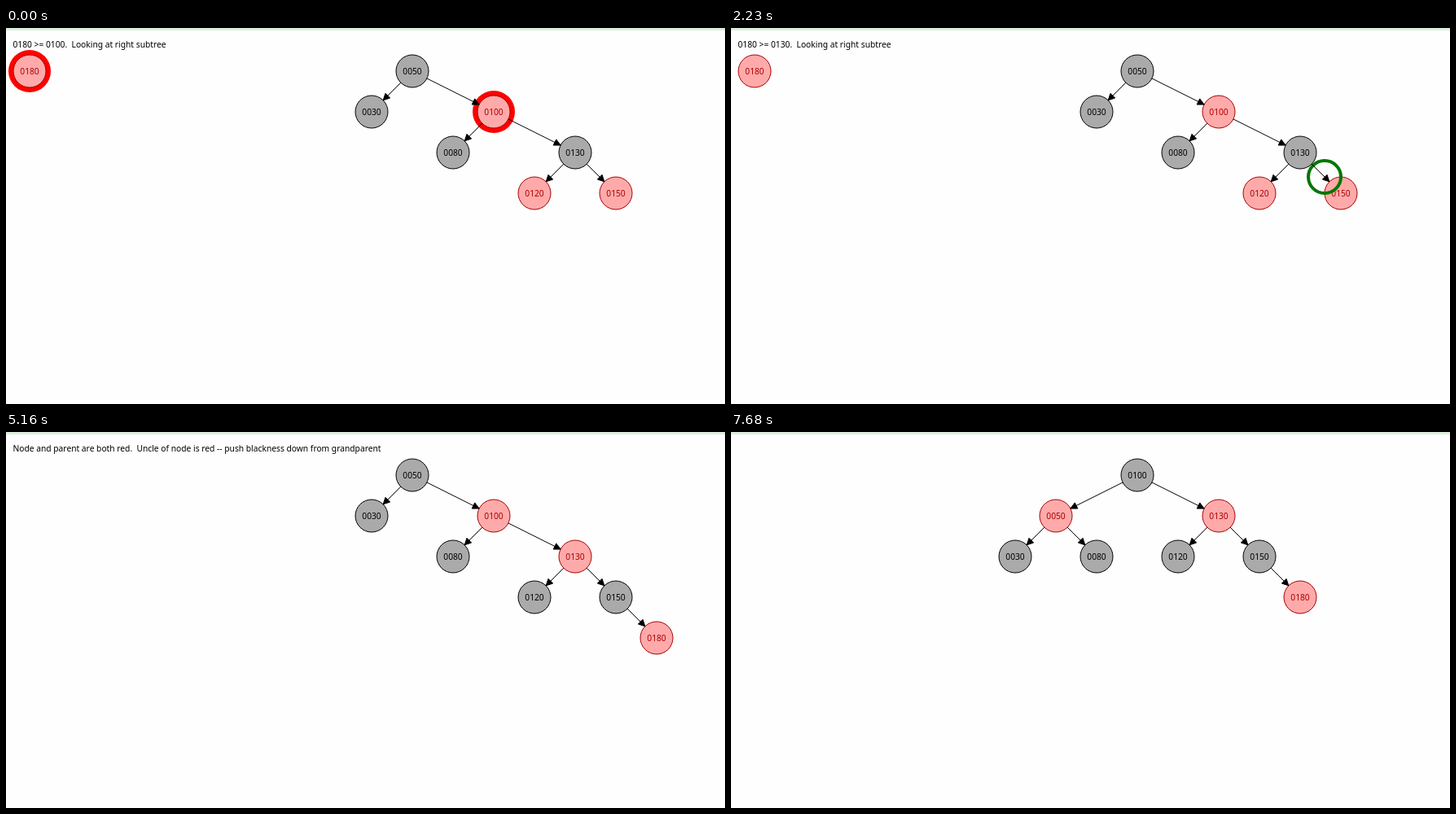
Write an HTML page with a canvas that moves like this. It is 883x462 px and loops after 8.84 s.

```html
<!DOCTYPE html>
<html lang="en">
<head>
<meta charset="utf-8">
<title>Red-black tree insertion</title>
<style>
  html, body { margin: 0; width: 100%; height: 100%; overflow: hidden; background: #fefefe; }
  canvas { display: block; }
</style>
</head>
<body>
<canvas id="stage" width="883" height="462"></canvas>
<script>
const ctx = document.getElementById('stage').getContext('2d');
const LOOP = 8840;
const R = 20;
const RED = { fill: '#ffaaaa', line: '#aa0000' };
const BLACK = { fill: '#aaaaaa', line: '#000000' };

// Runs of evenly spaced picture changes: [first, last, count]
const RUNS = [
  [0, 0, 1], [120, 1080, 8], [1230, 1380, 2], [1510, 2230, 6], [2380, 3290, 7],
  [3410, 3800, 4], [4450, 4450, 1], [5160, 5160, 1], [5760, 5760, 1],
  [6440, 7230, 7], [7370, 7680, 3]
];
const TICKS = RUNS.flatMap(([a, b, n]) =>
  Array.from({ length: n }, (_, i) => n > 1 ? a + (b - a) * i / (n - 1) : a));

// Node places before and after the rotation
const PLACES = {
  '0050': [499, 53, 399, 103],
  '0030': [449, 103, 349, 153],
  '0100': [599, 103, 499, 53],
  '0080': [549, 153, 449, 153],
  '0130': [699, 153, 599, 103],
  '0120': [649, 203, 549, 153],
  '0150': [749, 203, 649, 153],
  '0180': [799, 253, 699, 203]
};

const T = {
  leave100: 600, at130: 1230, leave130: 1870, at150: 2500,
  insert: 3020, inserted: 3545, settled: 3800,
  clash: 4450, recolour: 5160, explain: 5760,
  rotate: 6440, turn: 7006, turned: 7566, done: 7680
};

const MESSAGES = [
  [0, '0180 >= 0100.  Looking at right subtree'],
  [T.at130, '0180 >= 0130.  Looking at right subtree'],
  [T.at150, '0180 >= 0150.  Looking at right subtree'],
  [T.insert, 'Found null tree (or phantom leaf), inserting element'],
  [T.clash, 'Node and parent are both red.  Uncle of node is red -- push blackness down from grandparent'],
  [T.explain, 'Node and parent are both red.  Node is right child, parent is right child\nCan fix extra redness with a single rotation'],
  [T.rotate, 'Single Rotate Left'],
  [T.done, '']
];

const within = (t, a, b) => t >= a && t < b;
const progress = (t, a, b) => Math.min(1, Math.max(0, (t - a) / (b - a)));
const mix = (a, b, p) => a + (b - a) * p;
const mixPoint = (a, b, p) => [mix(a[0], b[0], p), mix(a[1], b[1], p)];

// Highlight width swings between 3 and 7
function pulse(t) {
  const phase = (t + 1470) % 1680;
  return 7 - Math.min(phase, 1680 - phase) / 210;
}

function place(name, t) {
  if (name === '0180' && t < T.settled) {
    return t < T.inserted
      ? mixPoint([29, 53], [786.5, 253], progress(t, T.insert, T.inserted))
      : mixPoint([786.5, 253], [799, 253], progress(t, T.inserted, T.settled));
  }
  const [x0, y0, x1, y1] = PLACES[name];
  return mixPoint([x0, y0], [x1, y1], progress(t, T.turn, T.turned));
}

function redNodes(t) {
  if (t < T.recolour) return ['0100', '0120', '0150', '0180'];
  if (t < T.done) return ['0100', '0130', '0180'];
  return ['0050', '0130', '0180'];
}

function highlighted(t) {
  if (t < T.leave100) return ['0180', '0100'];
  if (within(t, T.at130, T.leave130)) return ['0180', '0130'];
  if (within(t, T.at150, T.insert)) return ['0180', '0150'];
  return [];
}

function edges(t) {
  const list = [['0050', '0030'], ['0100', '0130'], ['0130', '0120'], ['0130', '0150']];
  if (t < T.turn) list.push(['0050', '0100'], ['0100', '0080']);
  else list.push(['0100', '0050'], ['0050', '0080']);
  if (t >= T.insert) list.push(['0150', '0180']);
  return list;
}

function circle(x, y, r) {
  ctx.beginPath();
  ctx.arc(x, y, r, 0, Math.PI * 2);
}

function drawNode(name, [x, y], look, halo) {
  if (halo) {
    circle(x, y, R + halo);
    ctx.fillStyle = '#ff0000';
    ctx.fill();
  }
  circle(x, y, R);
  ctx.fillStyle = look.fill;
  ctx.strokeStyle = look.line;
  ctx.lineWidth = 1;
  ctx.fill();
  ctx.stroke();
  ctx.fillStyle = look.line;
  ctx.textAlign = 'center';
  ctx.fillText(name, x, y + 4);
}

function drawRing([x, y]) {
  circle(x, y, R);
  ctx.strokeStyle = '#007700';
  ctx.lineWidth = 4;
  ctx.stroke();
}

function drawArrow(from, to, width, colour) {
  const dx = to[0] - from[0], dy = to[1] - from[1];
  const len = Math.hypot(dx, dy);
  const ux = dx / len, uy = dy / len;
  const tipX = to[0] - ux * R, tipY = to[1] - uy * R;
  ctx.strokeStyle = ctx.fillStyle = colour;
  ctx.lineWidth = width;
  ctx.beginPath();
  ctx.moveTo(from[0] + ux * R, from[1] + uy * R);
  ctx.lineTo(tipX, tipY);
  ctx.stroke();
  ctx.beginPath();
  ctx.moveTo(tipX, tipY);
  ctx.lineTo(tipX - ux * 8 - uy * 4, tipY - uy * 8 + ux * 4);
  ctx.lineTo(tipX - ux * 8 + uy * 4, tipY - uy * 8 - ux * 4);
  ctx.closePath();
  ctx.stroke();
  ctx.fill();
}

function drawMessage(t) {
  const text = MESSAGES.filter(([start]) => t >= start).pop()[1];
  ctx.fillStyle = '#000';
  ctx.textAlign = 'left';
  text.split('\n').forEach((line, i) => ctx.fillText(line, 8.5, 24 + i * 12));
}

function draw(t) {
  ctx.fillStyle = '#fefefe';
  ctx.fillRect(0, 0, 883, 462);
  ctx.fillStyle = '#dbeedb';
  ctx.fillRect(0, 0, 883, 3);
  ctx.font = '10.25px "Noto Sans", "Open Sans", sans-serif';

  drawMessage(t);
  const red = redNodes(t), lit = highlighted(t);
  for (const name in PLACES) {
    drawNode(name, place(name, t), red.includes(name) ? RED : BLACK, lit.includes(name) ? pulse(t) : 0);
  }

  if (within(t, T.leave100, T.at130)) {
    drawRing(mixPoint([599, 103], [699, 153], progress(t, T.leave100, 1200)));
  } else if (within(t, T.leave130, T.at150)) {
    drawRing(mixPoint([699, 153], [749, 203], progress(t, T.leave130, 2470)));
  }

  for (const [a, b] of edges(t)) {
    const from = place(a, t), to = place(b, t);
    if (a === '0050' && b === '0100' && within(t, T.rotate, T.turn)) {
      drawArrow(from, to, pulse(t), '#ff0000');
    }
    drawArrow(from, to, 1, '#000');
  }
}

const start = performance.now();
function tick() {
  const t = (performance.now() - start) % LOOP;
  draw(TICKS.filter(v => v <= t).pop() ?? 0);
  requestAnimationFrame(tick);
}
tick();
</script>
</body>
</html>
```
